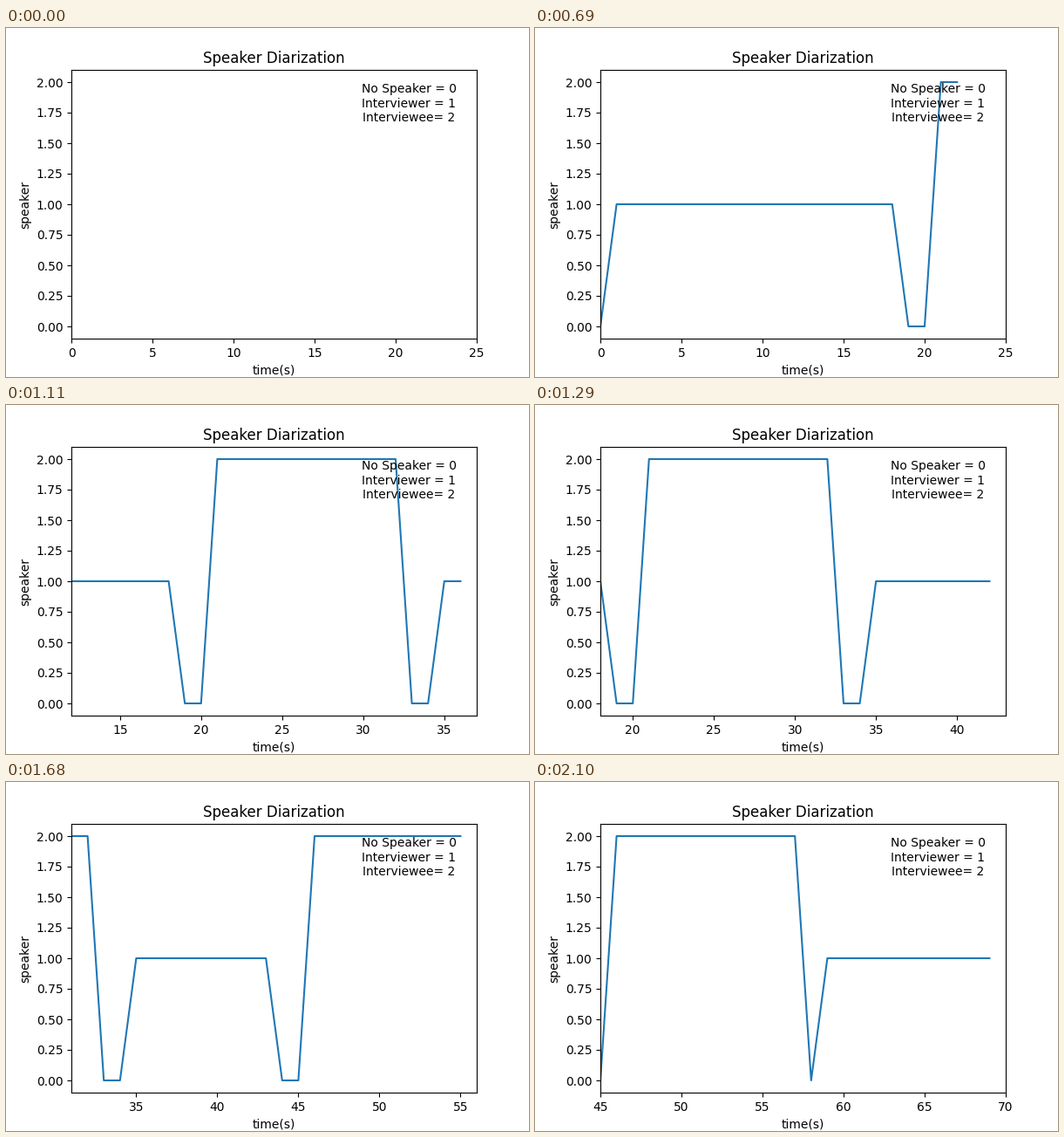
A matplotlib script for the animation above (2130 ms loop, 600x400 px).

```python
import matplotlib.pyplot as plt
import numpy as np
from matplotlib.animation import FuncAnimation

FRAMES = 71
WINDOW = 25

# The two speakers alternate, with silence (0) between their turns.
STARTS = 1, 21, 35, 46, 59
ENDS = 18, 32, 43, 57, 69

seconds = np.arange(ENDS[-1] + 1)
speaker = np.zeros(len(seconds))
for turn, (start, end) in enumerate(zip(STARTS, ENDS)):
    speaker[start:end + 1] = 1 + turn % 2

fig, ax = plt.subplots(figsize=(6, 4), dpi=100)
line, = ax.plot([], [])
ax.set(title="Speaker Diarization", xlabel="time(s)", ylabel="speaker",
       xlim=(0, WINDOW), ylim=(-0.1, 2.1))
ax.text(0.95, 0.95, "No Speaker = 0\nInterviewer = 1\nInterviewee= 2",
        transform=ax.transAxes, ha="right", va="top",
        multialignment="center")


def update(i):
    line.set_data(seconds[:i], speaker[:i])
    right = max(i, WINDOW)
    ax.set_xlim(right - WINDOW, right)
    return line,


anim = FuncAnimation(fig, update, frames=FRAMES, interval=30,
                     repeat=True, repeat_delay=0, blit=False)
plt.show()
```
